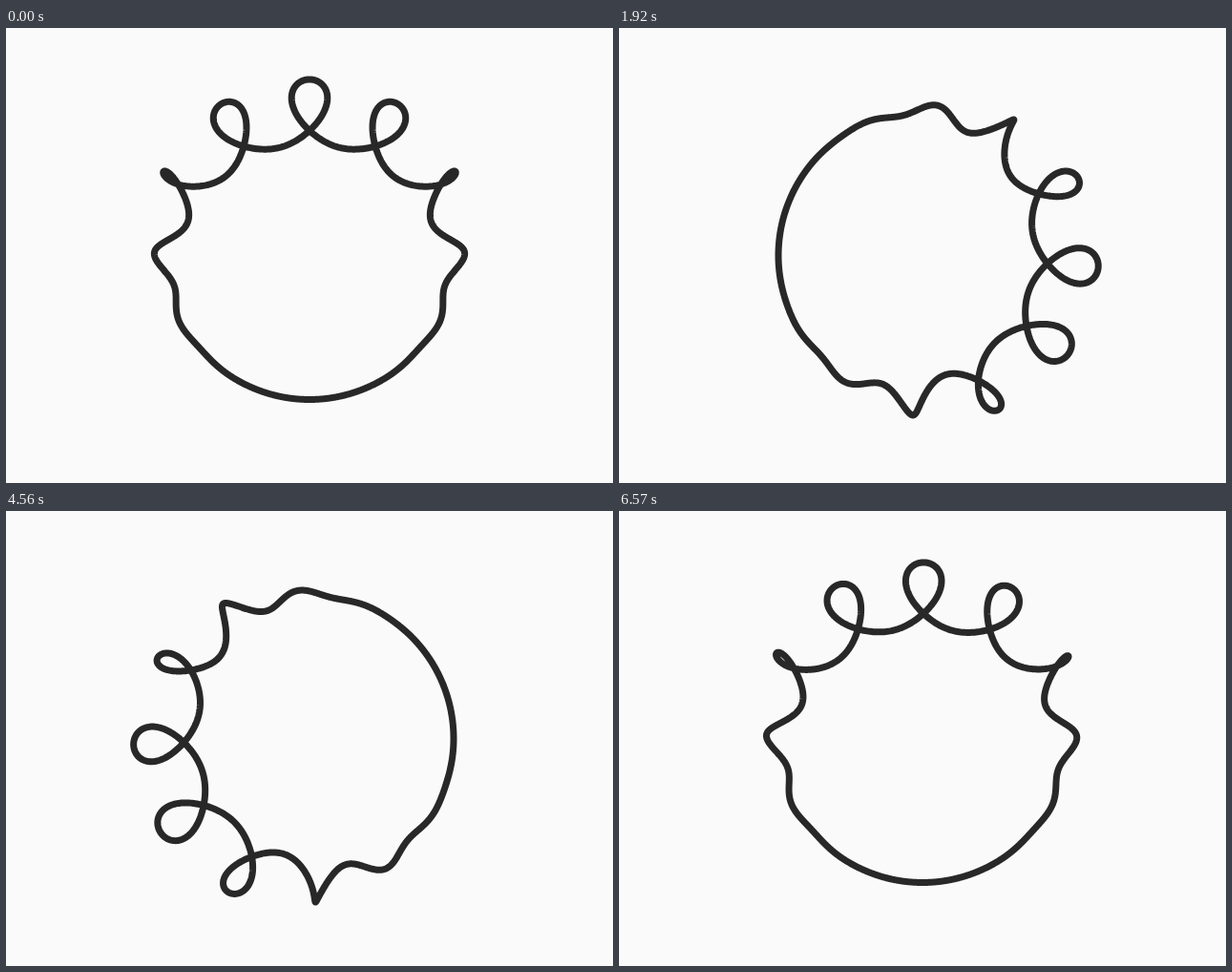
These frames come from a looping animation (636 px wide and 477 px high, 6.6 s). An HTML page with a canvas:

```html
<!DOCTYPE html>
<html lang="en">
<head>
<meta charset="utf-8">
<title>Travelling loops</title>
<style>
  html, body { margin: 0; width: 100%; height: 100%; overflow: hidden; background: #fafafa; }
  canvas { display: block; }
</style>
</head>
<body>
<canvas width="636" height="477"></canvas>
<script>
const ctx = document.querySelector('canvas').getContext('2d');
const TAU = Math.PI * 2;
const LOOP = 6600, STEP = 30;
const CX = 318, CY = 238.5, RADIUS = 151;
const WAVES = 12, HEIGHT = 33.6, SWAY = 0.23;
const POINTS = 1800;

const smooth = x => x * x * (3 - 2 * x);

// Wave strength: 1 at the crest of the envelope, 0 on the far side.
const strength = a => smooth(((1 + Math.cos(a)) / 2) ** 1.35);

function draw(t) {
  const crest = TAU * t;          // the envelope makes one full turn
  const drift = -TAU / 4 * t;     // the waves slip back three places
  ctx.fillStyle = '#fafafa';
  ctx.fillRect(0, 0, 636, 477);
  ctx.beginPath();
  for (let i = 0; i < POINTS; i++) {
    const a = TAU * i / POINTS;
    const e = strength(a - crest);
    const phase = WAVES * (a - drift);
    const r = RADIUS + HEIGHT * e * Math.cos(phase);
    const angle = a - SWAY * e ** 2.5 * Math.sin(phase);
    ctx.lineTo(CX + r * Math.sin(angle), CY - r * Math.cos(angle));
  }
  ctx.closePath();
  ctx.lineWidth = 7;
  ctx.lineJoin = 'round';
  ctx.strokeStyle = '#282828';
  ctx.stroke();
}

const start = performance.now();
function frame() {
  const ms = Math.max(0, performance.now() - start) % LOOP;
  draw(Math.floor(ms / STEP) * STEP / LOOP);
  requestAnimationFrame(frame);
}
frame();
</script>
</body>
</html>
```
